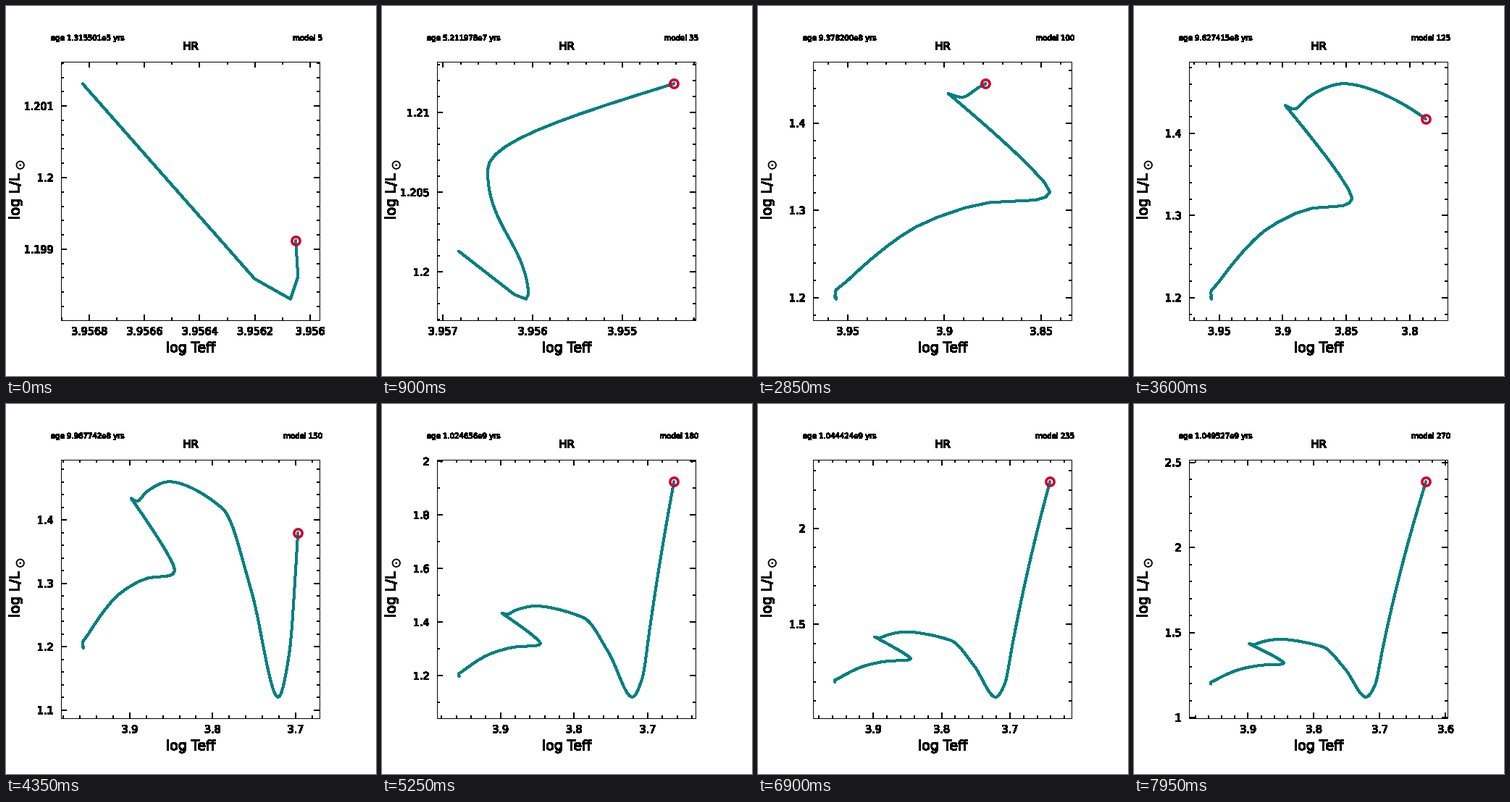
These frames come from a looping animation (511 by 511 pixels, 8 s). A matplotlib script:

```python
import numpy as np
import matplotlib.pyplot as plt
from matplotlib.animation import FuncAnimation
from matplotlib.collections import LineCollection
from matplotlib.patches import Circle, Rectangle
from matplotlib.patheffects import withStroke

SIZE, DPI = 511, 100
PX = 72 / DPI  # points per pixel
LEFT, RIGHT, TOP, BOTTOM = 76, 433, 77.5, 434.5
TEAL, CRIMSON = "#008080", "#d00030"

# Turning points of the track up to the giant branch: model, log Teff, log L
TURNS = [
    (1, 3.956824, 1.201313), (2, 3.956201, 1.198586), (3, 3.956071, 1.198303),
    (4, 3.956044, 1.198616), (5, 3.956052, 1.199121), (25, 3.9565, 1.2064),
    (44, 3.9494, 1.221), (50, 3.9146, 1.2812), (53, 3.8768, 1.3089),
    (56, 3.8524, 1.3121), (58, 3.8454, 1.3208), (65, 3.8981, 1.434),
    (80, 3.891, 1.4297), (100, 3.8787, 1.4452), (110, 3.852, 1.4605),
    (125, 3.7873, 1.4171), (134, 3.753, 1.287), (142, 3.721, 1.1207),
    (146, 3.7075, 1.19), (150, 3.697, 1.3795),
]
GIANT_LUM = [(150, 1.3795), (180, 1.9245), (235, 2.243), (270, 2.3865)]
AGES = [(45, 3.2317e8), (55, 8.4e8), (65, 9.31561e8), (100, 9.3782e8),
        (150, 9.967742e8), (180, 1.024656e9), (235, 1.044424e9), (270, 1.049527e9)]


def monotone_cubic(x, keys):
    """Cubic Hermite curve through (x, y) keys, without overshoot."""
    xs, ys = np.array(keys, float).T
    step = np.diff(xs)
    secant = np.diff(ys) / step
    product, total = secant[:-1] * secant[1:], secant[:-1] + secant[1:]
    inner = np.where(product > 0, 2 * product / np.where(total == 0, 1, total), 0)
    slope = np.concatenate([secant[:1], inner, secant[-1:]])
    i = np.clip(np.searchsorted(xs, x, side="right") - 1, 0, len(xs) - 2)
    h, t = step[i], (x - xs[i]) / step[i]
    return (ys[i] * (1 + 2 * t) * (1 - t) ** 2 + h * slope[i] * t * (1 - t) ** 2
            + ys[i + 1] * t * t * (3 - 2 * t) + h * slope[i + 1] * t * t * (t - 1))


def build_track():
    """Whole models while the steps are visible, then a finer curve."""
    models = np.concatenate([np.arange(1, 60), np.arange(60, 270.1, 0.25)])
    early, giant = models[models <= 150], models[models > 150]
    teff = monotone_cubic(early, [(m, t) for m, t, _ in TURNS])
    lum = monotone_cubic(early, [(m, l) for m, _, l in TURNS])
    giant_lum = monotone_cubic(giant, GIANT_LUM)
    rise = giant_lum - lum[-1]
    giant_teff = teff[-1] - 0.0525 * rise - 0.014 * rise ** 2
    return models, np.append(teff, giant_teff), np.append(lum, giant_lum)


MODELS, TEFF, LUM = build_track()


def age_text(model):
    if model <= 45:  # the time step grows by a fifth with each model
        age = 1.315501e5 * (1.2 ** model - 1) / (1.2 ** 5 - 1)
    else:
        age = monotone_cubic(model, AGES)
    mantissa, exponent = f"{age:.6e}".split("e")
    return f"age {mantissa}e{int(exponent)} yrs"


def tick_values(lo, hi):
    """Major step is a fifth of the range rounded up to 1, 2 or 5."""
    rough = 0.2 * (hi - lo)
    power = 10 ** np.floor(np.log10(rough))
    factor = next(f for f in (2, 5, 10) if rough <= f * power)
    parts = 2 if factor == 2 else 5
    minor = factor * power / parts
    for n in range(int(np.ceil(lo / minor)), int(np.floor(hi / minor)) + 1):
        yield n * minor, n % parts == 0


plt.rcParams.update({"font.family": "DejaVu Sans", "text.antialiased": False})
fig = plt.figure(figsize=(SIZE / DPI, SIZE / DPI), dpi=DPI, facecolor="white")
ax = fig.add_axes([0, 0, 1, 1])
ax.set(xlim=(0, SIZE), ylim=(SIZE, 0))
ax.axis("off")


def write(x, y, text, size, ha="center", heavy=0.35, **kw):
    label = ax.text(x, y, text, fontsize=size * PX, ha=ha, va="baseline", **kw)
    label.set_path_effects([withStroke(linewidth=heavy * PX, foreground="black")])
    return label


ax.add_patch(Rectangle((LEFT, TOP), RIGHT - LEFT, BOTTOM - TOP, fill=False,
                       lw=PX, ec="black", antialiased=False))
write(255, 60.5, "HR", 15)
write(255, 478, "log Teff", 19)
write(18.5, 295, "log L/L", 19.3, ha="left", rotation=90, rotation_mode="anchor")
ax.add_patch(Circle((19.7, 219.7), 5.2, fill=False, lw=1.8 * PX, ec="black"))
ax.add_patch(Circle((19.7, 219.7), 1.3, color="black", lw=0))

ticks = ax.add_collection(LineCollection([], colors="black", linewidths=1.5 * PX,
                                         antialiaseds=False))
trail, = ax.plot([], [], color=TEAL, lw=3 * PX, antialiased=False, zorder=3,
                 solid_capstyle="round", solid_joinstyle="round")
ring, = ax.plot([], [], "o", ms=11.2 * PX, mfc="none", mec=CRIMSON, mew=3.6 * PX,
                antialiased=False, zorder=4)
caption = write(62, 47.5, "", 10.1, ha="left")
counter = write(437, 47.5, "", 10.1, ha="right")
tick_labels = []


def padded(values):
    margin = 0.1 * np.ptp(values)
    return values.min() - margin, values.max() + margin


def update(frame):
    model = 5 + 5 * (frame // 3)
    shown = MODELS <= model
    teff, lum = TEFF[shown], LUM[shown]
    (x_lo, x_hi), (y_lo, y_hi) = padded(teff), padded(lum)

    def to_x(v):
        return LEFT + (x_hi - v) / (x_hi - x_lo) * (RIGHT - LEFT)

    def to_y(v):
        return BOTTOM - (v - y_lo) / (y_hi - y_lo) * (BOTTOM - TOP)

    while tick_labels:
        tick_labels.pop().remove()
    segments = []
    for value, major in tick_values(x_lo, x_hi):
        x, length = to_x(value), 8 if major else 4
        segments += [[(x, TOP), (x, TOP + length)], [(x, BOTTOM), (x, BOTTOM - length)]]
        if major:
            tick_labels.append(write(x, 454, f"{value:.6g}", 14.3))
    for value, major in tick_values(y_lo, y_hi):
        y, length = to_y(value), 8 if major else 4
        segments += [[(LEFT, y), (LEFT + length, y)], [(RIGHT, y), (RIGHT - length, y)]]
        if major:
            tick_labels.append(write(65.5, y + 5.3, f"{value:.6g}", 14.3, ha="right"))
    ticks.set_segments(segments)

    xs, ys = to_x(teff), to_y(lum)
    trail.set_data(xs, ys)
    ring.set_data(xs[-1:], ys[-1:])
    caption.set_text(age_text(model))
    counter.set_text(f"model {model}")
    return [ticks, trail, ring, caption, counter, *tick_labels]


anim = FuncAnimation(fig, update, frames=160, interval=50, repeat=True, repeat_delay=0)
plt.show()
```
